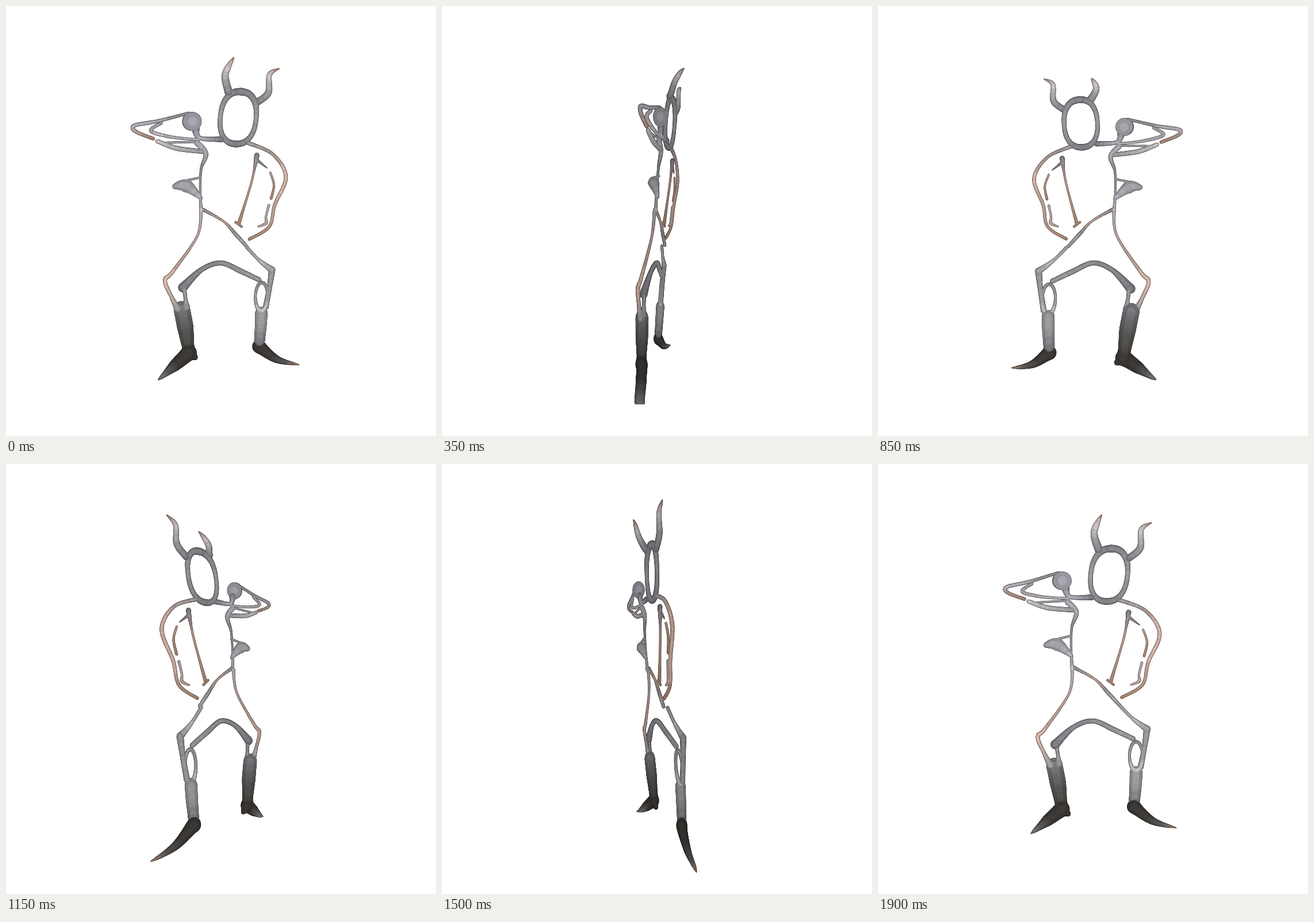
An HTML page with a canvas for the animation above (1.95 s loop, 748x748 px).

```html
<!DOCTYPE html>
<html lang="en">
<head>
<meta charset="utf-8">
<title>Turning horned figure</title>
<style>
html, body { margin: 0; width: 100%; height: 100%; overflow: hidden; background: #fff; }
canvas { display: block; width: 100vmin; height: 100vmin; }
</style>
</head>
<body>
<canvas id="stage" width="748" height="748"></canvas>
<script>
const ctx = document.getElementById('stage').getContext('2d');
const SIZE = 748, MID = SIZE / 2, EYE = MID * Math.sqrt(3);
const STEPS = 39, STEP_MS = 50, TURN = Math.PI * 2;

const gray = (v, warm = 0, blue = 0) => [v + warm, v, v - warm + blue];
const SKIN = gray(166, 30, 18), TAN = gray(138, 36, 16), PALE = gray(178, 6, 8);
const LILAC = gray(160, 3, 12), ASH = gray(142, 0, 2), SLATE = gray(116, 2, 8);
const SOOT = gray(76, 2), COAL = gray(54, 3);

const lerp = (a, b, t) => Array.isArray(a) ? a.map((v, i) => lerp(v, b[i], t)) : a + (b - a) * t;

// Value at u (0..1) in a list of evenly spaced stops.
function mix(stops, u) {
  const at = u * (stops.length - 1), i = Math.min(Math.floor(at), Math.max(0, stops.length - 2));
  return lerp(stops[i], stops[i + 1] ?? stops[i], at - i);
}

function spline(points, u) {
  const at = u * (points.length - 1), i = Math.min(Math.floor(at), points.length - 2), t = at - i;
  const p = k => points[Math.max(0, Math.min(points.length - 1, i + k))];
  return [0, 1].map(c => {
    const [a, b, d, e] = [p(-1)[c], p(0)[c], p(1)[c], p(2)[c]];
    return b + t / 2 * (d - a + t * (2 * a - 5 * b + 4 * d - e + t * (3 * (b - d) + e - a)));
  });
}

// The body leans back toward the feet, the right leg a little more.
const depth = (x, y) => 20 - (y - 150) * 0.067 - (y > 420 ? Math.max(0, x - MID) * 0.13 : 0);

const parts = [];

// A tapered tube through key points of the front view; lift and lean shift its depth.
function tube(points, radii, colors, { lift = 0, lean = 0, flat = 0 } = {}) {
  const length = points.slice(1).reduce((sum, p, i) => sum + Math.hypot(p[0] - points[i][0], p[1] - points[i][1]), 0);
  const n = Math.ceil(length);
  parts.push(Array.from({ length: n + 1 }, (_, i) => {
    const u = i / n, [x, y] = spline(points, u), r = mix(radii, u);
    const z = depth(x, y) + lift + lean * u, unit = 1 - z / EYE;
    return {
      x: (x - MID) * unit, y: (y - MID) * unit, z, r: r * unit,
      thick: Math.max(flat, Math.min(r, 1 + 0.6 * r)),
      color: mix(colors, u),
      grain: Math.abs(Math.sin(x * 12.99 + y * 78.23) * 43758.5) % 1 - 0.5
    };
  }));
}

// Closed loop from the top, clockwise; skew moves the top sideways.
function ring(cx, cy, rx, ry, skew, power, radii, colors) {
  const bend = v => Math.sign(v) * Math.abs(v) ** power;
  tube(Array.from({ length: 25 }, (_, i) => {
    const s = bend(Math.sin(i / 24 * TURN)), c = bend(Math.cos(i / 24 * TURN));
    return [cx + rx * s + skew * c, cy - ry * c];
  }), radii, colors);
}

// Head and horns
ring(402, 193, 32, 46, 4, 0.86, [6.5, 5.5, 4.2, 4.5, 6, 4.5, 4, 5, 6.5], [SLATE, ASH, SLATE, ASH, SLATE]);
tube([[384, 149], [376, 119], [389, 88]], [7, 6.5, 5.5, 0.6], [SLATE, ASH, PALE, TAN], { lean: 21 });
tube([[436, 164], [456, 146], [458, 114], [476, 102]], [6, 6, 4.5, 0.6], [SLATE, ASH, PALE, TAN], { lean: -3 });

// Raised arm
const ARM = { lift: 4 };
tube([[319, 203], [321, 203]], [16], [SLATE, LILAC], ARM);
tube([[326, 215], [334, 231], [372, 232]], [7, 3.5, 5], [SLATE, LILAC, SLATE], ARM);
tube([[314, 189], [262, 205], [224, 214], [226, 224], [255, 235]], [2.5, 3.3, 3, 2.8], [ASH, LILAC, TAN], ARM);
tube([[268, 208], [251, 222], [285, 231], [332, 234]], [2.5, 3, 2.3], [LILAC, PALE], ARM);
tube([[262, 239], [295, 250], [338, 254]], [3.3, 4.3, 4], [PALE, ASH], ARM);
tube([[277, 241], [325, 238]], [2], [LILAC], ARM);

// Torso and chest
tube([[330, 240], [345, 258], [337, 285], [336, 325], [338, 357]], [5, 4.2, 2.2, 2, 3.3], [LILAC, ASH, PALE], { lift: 2 });
tube([[292, 315], [312, 314], [338, 335]], [4, 11, 2], [ASH, LILAC], ARM);
tube([[314, 304], [336, 299]], [2], [LILAC], ARM);

// Lowered arm
tube([[418, 236], [465, 255], [490, 295], [470, 345], [460, 384], [424, 406]], [3.5, 2.8, 3.4, 3, 2.6, 2.6], [ASH, SKIN, SKIN, TAN]);
tube([[436, 258], [427, 305], [405, 378]], [4.5, 2, 2, 3], [SLATE, SKIN, TAN]);
tube([[436, 266], [455, 280]], [3, 0.8], [ASH]);
tube([[399, 376], [410, 384]], [2], [TAN]);
tube([[461, 288], [468, 310], [463, 334]], [1.8, 2.3], [SKIN, TAN]);
tube([[459, 346], [454, 366], [454, 378], [440, 384]], [2.4, 2, 2.8, 1.4], [PALE, SKIN]);

// Thighs
tube([[341, 354], [378, 375], [402, 400], [440, 440], [468, 461]], [3, 2, 3.2, 2.6, 6], [ASH, SKIN, ASH, PALE, ASH]);
tube([[338, 357], [332, 400], [291, 460], [278, 475], [289, 503], [300, 524]], [3, 2.2, 3, 3.4, 3, 6], [PALE, SKIN, SKIN, ASH]);
tube([[308, 488], [340, 458], [374, 447], [410, 462], [444, 478]], [8, 4.2, 4.2, 4.6, 4], [SLATE, ASH]);

// Left leg
const TOE = { lean: 18 };
tube([[311, 492], [315, 522]], [3.5, 3, 6], [ASH]);
tube([[307, 525], [313, 555], [318, 587], [320, 600]], [14, 14, 10.5, 12], [SLATE, SOOT, COAL]);
tube([[322, 602], [331, 609]], [10, 4], [COAL]);
tube([[320, 600], [295, 620], [266, 643]], [13.5, 10, 0.6], [COAL, COAL, SLATE], { ...TOE, flat: 8 });

// Right leg
tube([[468, 461], [464, 490], [457, 527]], [6, 4.5, 5], [ASH]);
ring(449, 508, 11.5, 25, 0, 1, [2.8, 2.8, 4, 2.5, 2.8], [ASH, PALE, ASH]);
tube([[449, 537], [448, 560], [446, 586]], [11, 10.5, 9.5], [ASH, ASH, SLATE]);
tube([[445, 596], [478, 621], [519, 633]], [12, 6.5, 0.6], [COAL, COAL, SOOT, TAN], TOE);

function draw(step) {
  const angle = (step + 1) / STEPS * TURN, cos = Math.cos(angle), sin = Math.sin(angle);
  const shade = 0.75 + 0.25 * Math.abs(cos);

  const project = b => {
    const near = b.z * cos - b.x * sin, k = EYE / (EYE - near);
    return {
      ...b, near,
      x: MID + (b.x * cos + b.z * sin) * k, y: MID + b.y * k,
      rx: Math.hypot(b.r * cos, b.thick * sin) * k, ry: b.r * k
    };
  };
  const paint = (b, scale, inset, light) => {
    ctx.fillStyle = `rgb(${b.color.map(v => Math.min(255, Math.round(v * light)))})`;
    ctx.beginPath();
    ctx.ellipse(b.x, b.y, Math.max(0.4, b.rx * scale - inset), Math.max(0.4, b.ry * scale - inset), 0, 0, TURN);
    ctx.fill();
  };

  ctx.fillStyle = '#fff';
  ctx.fillRect(0, 0, SIZE, SIZE);
  const mean = beads => beads.reduce((sum, b) => sum + b.near, 0) / beads.length;
  const sorted = parts.map(part => part.map(project)).sort((a, b) => mean(a) - mean(b));

  // Dark rims first, so that joints stay seamless.
  sorted.flat().forEach(b => paint(b, 1, 0, shade * 0.55));
  for (const beads of sorted) {
    beads.forEach(b => paint(b, 1, 0.8, shade * (0.96 + b.grain * 0.08)));
    beads.filter(b => b.rx > 3).forEach(b => paint(b, 0.5, 0, shade * (1.1 + b.grain * 0.16)));
  }
}

let shown = -1;
const start = performance.now();
function tick() {
  const step = Math.floor((performance.now() - start) / STEP_MS) % STEPS;
  if (step !== shown) draw(shown = step);
  requestAnimationFrame(tick);
}
tick();
</script>
</body>
</html>
```
